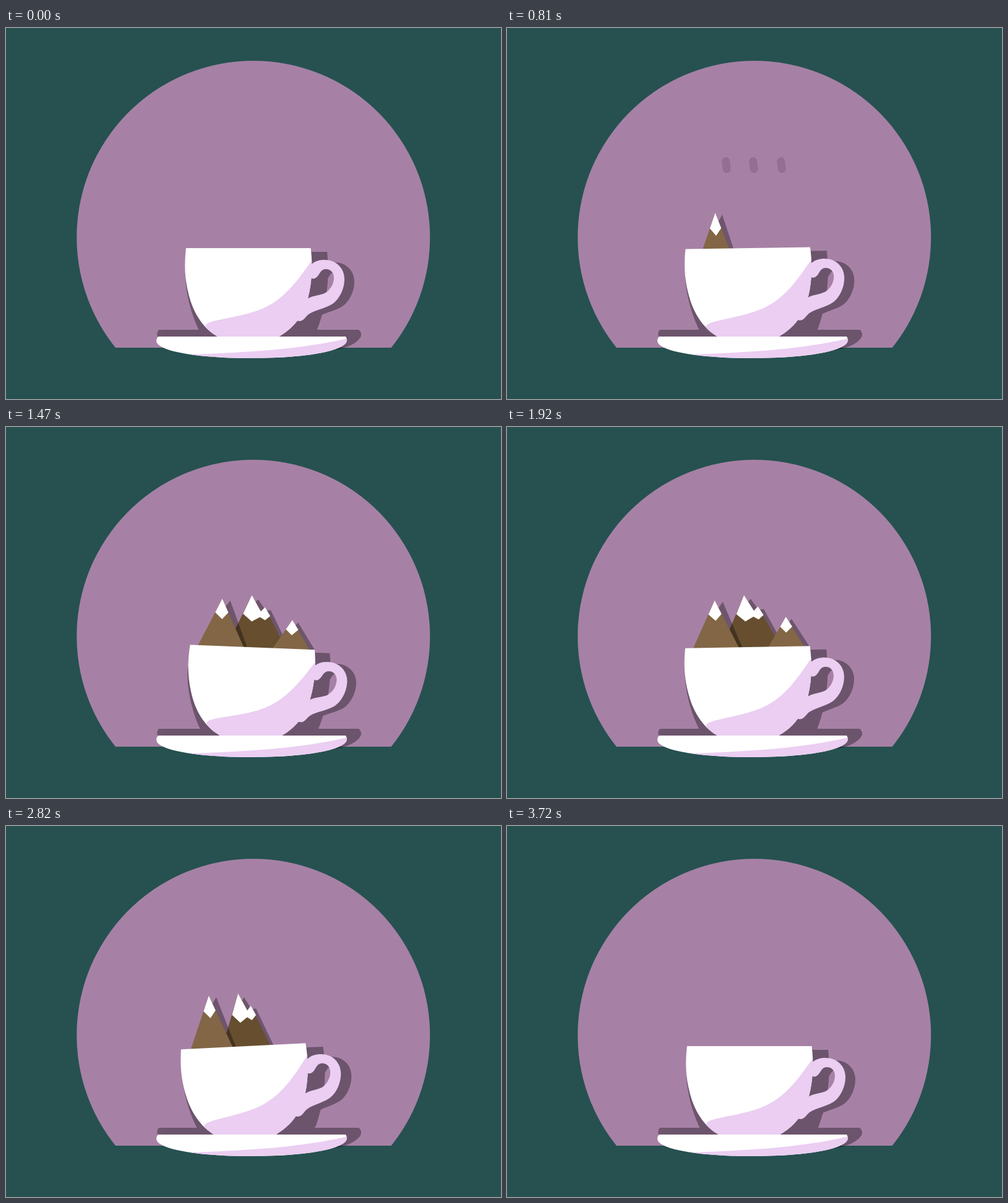
Write an HTML page that moves like this. It is 800 by 600 pixels and loops after 3750 ms.

```html
<!DOCTYPE html>
<html lang="en">
<head>
<meta charset="utf-8">
<title>Mountain tea</title>
<style>
  html, body { margin: 0; width: 100%; height: 100%; overflow: hidden; background: #265150; }
  svg { display: block; width: 800px; height: 600px; }
  .white { fill: #fff; }
  .lilac { fill: #ebcef2; }
  .shade { fill: #000; opacity: .34; }
  .side { fill: #826645; }
  .mid { fill: #664e2f; }
  .steam { fill: none; stroke: #956e92; stroke-width: 13; stroke-linecap: round; stroke-linejoin: round; }
</style>
</head>
<body>
<svg viewBox="0 0 800 600">
  <defs>
    <path id="bowl" d="M291 356H492.5C496 385 494.5 412 488 437C481 466 463 487 441 499L425 510H358L342 499C320 487 303 462 295.500 432C288.500 405 288 382 291 356Z"/>
    <path id="handle" d="M493 383C499 377 506 375 515 375C533 375 547 388 547 406C547 422 539 438 528 446C515 454 500 456 489 463C483 468 481 474 474 474C469 474 468 470 470 464L487 438C494 433 505 433 515 429C524 424 530 414 530 404C530 396 525 390 517 390C508 390 507 399 502 403C499 406 495 406 493 404Z"/>
    <path id="plate" d="M246 499H549C552 504 551 508 548 511C532 526 470 534 397 534C325 534 262 526 246 512C242 508 242 503 246 499Z"/>
    <clipPath id="inBowl"><use href="#bowl"/></clipPath>
    <clipPath id="inPlate"><use href="#plate"/></clipPath>
    <clipPath id="aboveRim"><rect x="200" y="100" width="400" height="257"/></clipPath>
  </defs>

  <path fill="#a681a5" d="M177 517A285.500 285.500 0 1 1 622.500 517Z"/>
  <g id="steam"></g>

  <g class="shade">
    <path d="M248 488H570C574 491 575 496 573 500C567 510 551 518 530 521L300 520C262 517 240 506 245 491Q246 488 248 488Z"/>
    <g id="cupShade">
      <path d="M296 362H519C521.500 385 521 408 518 430C515 452 509 472 502 490L480 512H330L311 487C299 462 289 425 290 395Z"/>
      <use href="#handle" x="16" y="4"/>
    </g>
  </g>

  <g id="cup">
    <g clip-path="url(#aboveRim)">
      <g id="centre">
        <path class="shade" d="M387.500 290L398 278L411 296L419 295L452 357H387Z"/>
        <path class="mid" d="M350 357L387.500 272L403 297.500L409.500 290.500L446 357Z"/>
        <path class="white" d="M374.500 302.500L387.500 272L403 297.500L409.500 290.500L418.500 304.500L410.500 311.500L402 307L389 314.500Z"/>
      </g>
      <g id="left">
        <path class="shade" d="M340 300L353 282L383.500 357H340Z"/>
        <path class="side" d="M303.500 357L340 279.500L378 357Z"/>
        <path class="white" d="M329.500 302L340 279.500L350.700 301.500L341 312.500Z"/>
      </g>
      <g id="right">
        <path class="shade" d="M454.500 325L463.500 311.500L492 357H454Z"/>
        <path class="side" d="M425 357L454.500 308L483.500 357Z"/>
        <path class="white" d="M445 324L454.500 308L464.500 324L454.500 333.500Z"/>
      </g>
    </g>
    <use href="#bowl" class="white"/>
    <path class="lilac" clip-path="url(#inBowl)" d="M496 373C470 411 447 442 409 456C377 468 337 471 325 478Q321 481 322 486L335 515H500V373Z"/>
    <use href="#handle" class="lilac"/>
  </g>

  <use href="#plate" class="white"/>
  <path class="lilac" clip-path="url(#inPlate)" d="M291 528C380 525 470 521 552 502V536H330Z"/>
</svg>
<script>
const LOOP = 3750;
const PIVOT = '391 520';
const RIM = 357;
const $ = id => document.getElementById(id);

const clamp = u => Math.min(1, Math.max(0, u));
const sine = u => (1 - Math.cos(Math.PI * u)) / 2;
const quad = u => u < .5 ? 2 * u * u : 1 - 2 * (1 - u) ** 2;
const easeOut = u => u * (2 - u);
const easeIn = u => u * u;

// Eased value of a [time, value] table.
function track(keys, t, ease = sine) {
  let i = 0;
  while (i < keys.length - 2 && t >= keys[i + 1][0]) i++;
  const [t0, a] = keys[i], [t1, b] = keys[i + 1];
  return a + (b - a) * ease(clamp((t - t0) / (t1 - t0)));
}

const cupTilt = [[580, 0], [1010, -1.6], [1500, 2.3], [1900, -1.05], [2220, .5],
                 [2490, 0], [2770, -3], [3235, 1.75], [3700, 0]];
const shadeTilt = [[580, 0], [1010, -1.5], [1600, 2], [1900, -1.05], [2240, .6],
                   [2490, 0], [2790, -2.4], [3260, 1.7], [3700, 0]];

// Each peak pops up at `up`, crouches from `down`, leaps and drops.
const peaks = [
  { id: 'left', x: 340, up: 690, down: 2490, top: 1.14 },
  { id: 'centre', x: 387.5, up: 930, down: 2370, top: 1.12 },
  { id: 'right', x: 454.5, up: 1080, down: 2200, top: 1.17 }
];

function drawPeak({ id, x, up, down, top }, t) {
  const leap = down + 390, gone = leap + 220;
  const drop = t < leap
    ? track([[up, 105], [up + 250, 0]], t, easeOut)
    : track([[leap, 0], [gone, 110]], t, easeIn);
  const sy = track([[up, 1.1], [up + 250, 1.14], [up + 390, .97], [up + 500, 1],
                    [down, 1], [down + 150, .87], [leap, top]], t);
  const sx = track([[up, .85], [up + 250, .88], [up + 390, 1.03], [up + 500, 1],
                    [down, 1], [down + 150, 1.13], [leap, .88]], t);
  const el = $(id);
  el.style.display = t > up && t < gone ? '' : 'none';
  el.setAttribute('transform',
    `translate(${x} ${RIM + drop}) scale(${sx} ${sy}) translate(${-x} ${-RIM})`);
}

const wisps = [354.5, 398.5, 443.5].map(x => {
  const el = document.createElementNS('http://www.w3.org/2000/svg', 'path');
  el.setAttribute('class', 'steam');
  $('steam').append(el);
  return { x, el };
});

function drawSteam(t) {
  const level = s => 365 - 153 * quad(clamp((s - 70) / 830));
  const head = level(t), tail = level(t - 100);
  const steps = 10;
  for (const { x, el } of wisps) {
    let d = '';
    for (let i = 0; i <= steps; i++) {
      const y = head + (tail - head) * i / steps;
      d += `${i ? 'L' : 'M'}${x + 1.5 * Math.sin((y - 222) / 13)} ${y}`;
    }
    el.setAttribute('d', d);
    el.style.display = t > 70 && t < 990 ? '' : 'none';
  }
}

function draw(t) {
  $('cup').setAttribute('transform', `rotate(${track(cupTilt, t)} ${PIVOT})`);
  $('cupShade').setAttribute('transform', `rotate(${track(shadeTilt, t)} ${PIVOT})`);
  peaks.forEach(p => drawPeak(p, t));
  drawSteam(t);
}

const start = performance.now();
function tick() {
  draw((performance.now() - start) % LOOP);
  requestAnimationFrame(tick);
}
tick();
</script>
</body>
</html>
```
